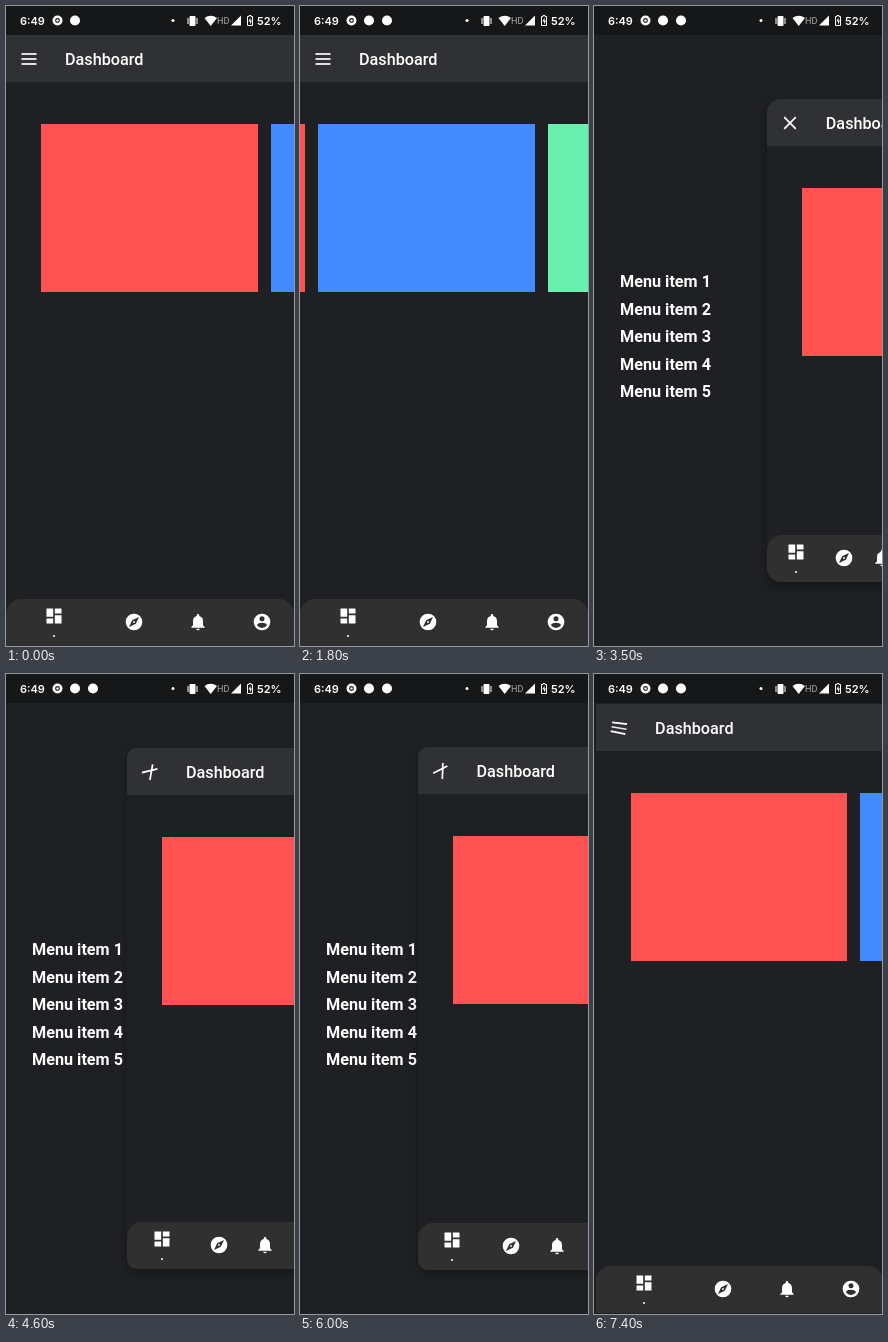
Recreate the animation shown at these times as an HTML page. Size 288 px wide and 640 px high, loop 7500 ms.

```html
<!DOCTYPE html>
<html lang="en">
<head>
<meta charset="utf-8">
<title>Dashboard drawer</title>
<style>
  html, body { margin: 0; width: 100%; height: 100%; overflow: hidden; background: #1e2023; }
  body { position: relative; color: #fff; font-family: Roboto, sans-serif; }
  svg { display: block; overflow: visible; }
  .status { position: absolute; left: 0; top: 0; background: #161718; }
  .status text { font: 600 11px Inter, sans-serif; }
  .status .small { font: 400 9px Roboto, sans-serif; fill: #aaa; }
  .menu { position: absolute; left: 26px; top: 262px; font-size: 16.2px; font-weight: 700; line-height: 27.6px; white-space: nowrap; }
  .page { position: absolute; overflow: hidden; background: #1e2023; }
  .bar { position: absolute; left: 0; right: 0; top: 0; height: 47px; background: #303134; }
  .bar svg { position: absolute; left: 23px; top: 24px; width: 1px; height: 1px; }
  .bar span { position: absolute; left: 59px; top: 0; font-size: 16.2px; font-weight: 500; line-height: 49px; }
  .card { position: absolute; top: 89px; height: 168px; }
  .nav { position: absolute; left: 0; right: 0; bottom: 0; height: 47px; display: flex; background: #303030; border-radius: 15px 15px 0 0; }
  .tab { position: relative; flex: 1 1 0; min-width: 0; }
  .tab svg { position: absolute; left: 50%; top: 13px; margin-left: -10px; }
  .tab i { position: absolute; left: 50%; top: 36px; width: 2px; height: 2px; margin-left: -1px; border-radius: 50%; background: #fff; }
</style>
</head>
<body>
<div class="menu"></div>

<div class="page">
  <div class="card" style="background:#ff5252"></div>
  <div class="card" style="background:#448aff"></div>
  <div class="card" style="background:#69f0ae"></div>
  <div class="bar">
    <svg stroke="#fff" stroke-width="1.7">
      <line class="stroke"/><line class="stroke"/><line class="stroke"/>
    </svg>
    <span>Dashboard</span>
  </div>
  <div class="nav"></div>
</div>

<svg class="status" width="288" height="29" fill="#fff">
  <text x="14" y="18.5">6:49</text>
  <circle cx="51.500" cy="14.500" r="3.700" fill="none" stroke="#fff" stroke-width="2.600"/>
  <circle cx="51.500" cy="14.500" r="1.200"/>
  <circle id="notice" cx="69" cy="14.500" r="5"/>
  <circle id="app" cx="69" cy="14.500" r="5"/>
  <circle cx="167" cy="14.500" r="1.500"/>
  <rect x="183.500" y="10" width="6" height="10" rx="1"/>
  <path d="M182 12v6M191 12v6" stroke="#fff"/>
  <path d="M198.500 12Q204.700 7.500 211 12L204.700 20Z"/>
  <text class="small" x="211" y="18">HD</text>
  <path d="M235 9.500V19.500H225Z"/>
  <path d="M241.500 10.500h1.500v-1h2v1h1.500v9h-5z" fill="none" stroke="#fff"/>
  <path d="M244.500 11.500l-2 4h1.500v3l2-4h-1.500z"/>
  <text x="251" y="18.500">52%</text>
</svg>

<script>
const LOOP = 7500, STEP = 100;
const STAGE_W = 288, STAGE_H = 640, STATUS_H = 29;
const SLIDE = 500, TAB_TIME = 300;
const TABS = [
  'M3 3h8v10H3zM13 3h8v6h-8zM3 15h8v6H3zM13 11h8v10h-8z',
  'M12 2a10 10 0 1 0 0 20a10 10 0 1 0 0-20zM18 6l-3.800 8.200L6 18l3.800-8.200zM12 10.900a1.100 1.100 0 1 0 0 2.200a1.100 1.100 0 1 0 0-2.200z',
  'M12 22a2 2 0 0 0 2-2h-4a2 2 0 0 0 2 2zM18 16v-5q0-5-4.500-6.300V4a1.500 1.500 0 0 0-3 0v.7Q6 6 6 11v5l-2 2v1h16v-1z',
  'M12 2a10 10 0 1 0 0 20a10 10 0 1 0 0-20zM12 5a3 3 0 1 1 0 6a3 3 0 1 1 0-6zM12 19.200q-3.900 0-6-3.200q.5-3 6-3.100q5.500.1 6 3.100q-2.100 3.200-6 3.200z'
];
const TAPS = [[0, 1], [350, 2], [700, 3], [1050, 0]];
const SLIDES = [[2850, 4450], [5660, 6906]];
const SWIPE_START = 1800;
const SWIPE = [247.400, 390, 440, 425, 290, 80, 12, 3, 1, 0];

const all = selector => [...document.querySelectorAll(selector)];
const [page] = all('.page'), [nav] = all('.nav'), [menu] = all('.menu');
const cards = all('.card'), strokes = all('.stroke');
const notice = document.getElementById('notice'), app = document.getElementById('app');

menu.innerHTML = [1, 2, 3, 4, 5].map(n => `<div>Menu item ${n}</div>`).join('');
nav.innerHTML = TABS.map(d => `<div class="tab"><svg width="20" height="20" viewBox="0 0 24 24">
  <path d="${d}" fill="#fff" fill-rule="evenodd"/></svg><i></i></div>`).join('');
const tabs = [...nav.children];

const ramp = (t, start, length) => Math.min(1, Math.max(0, (t - start) / length));
const openness = (t, closeLag = 0) => SLIDES.reduce((sum, [open, close]) =>
  sum + ramp(t, open, SLIDE) - ramp(t, close + closeLag, SLIDE), 0);

function drawPage(t) {
  const open = openness(t);
  const width = STAGE_W * (1 - 0.4 * open);
  Object.assign(page.style, {
    left: STAGE_W * 0.6 * open + 'px',
    top: STATUS_H + STAGE_H * 0.1 * open + 'px',
    width: width + 'px',
    height: STAGE_H - STATUS_H - STAGE_H * 0.2 * open + 'px',
    borderRadius: 14 * open + 'px',
    boxShadow: `0 4px 10px rgba(0,0,0,${0.4 * open})`
  });
  const pitch = width * 0.8;
  const scroll = SWIPE[(t - SWIPE_START) / STEP] || 0;
  cards.forEach((card, i) => {
    card.style.left = 35 + i * pitch - scroll + 'px';
    card.style.width = pitch - 13 + 'px';
  });
}

// Outer bars turn by different angles into a cross while the middle one fades.
function drawMenuIcon(t) {
  const u = openness(t, 20), half = 7.500 + 0.700 * u;
  [135, 180, 225].forEach((turn, i) => {
    const line = strokes[i];
    line.setAttribute('x1', -half);
    line.setAttribute('x2', half);
    line.setAttribute('transform', `rotate(${turn * u}) translate(0 ${(i - 1) * 5 * (1 - u)})`);
  });
  strokes[1].setAttribute('opacity', Math.max(0, 1 - 2 * u));
}

function drawTabs(t) {
  let from = 0, to = 0, start = 0;
  for (const [time, index] of TAPS) {
    if (t >= time) [from, to, start] = [to, index, time];
  }
  const k = ramp(t, start, TAB_TIME);
  tabs.forEach((tab, i) => {
    const weight = (i === to ? k : 0) + (i === from ? 1 - k : 0);
    tab.style.flexGrow = 1 + 0.5 * weight;
    tab.firstChild.style.transform = `translateY(${-6 * weight}px)`;
    tab.lastChild.style.opacity = weight;
  });
}

function frame(now) {
  const t = Math.floor(now / STEP) * STEP % LOOP;
  drawPage(t);
  drawMenuIcon(t);
  drawTabs(t);
  const noticed = t >= 500;
  notice.style.display = noticed ? '' : 'none';
  app.setAttribute('cx', noticed ? 87 : 69);
  requestAnimationFrame(frame);
}
frame(0);
</script>
</body>
</html>
```
